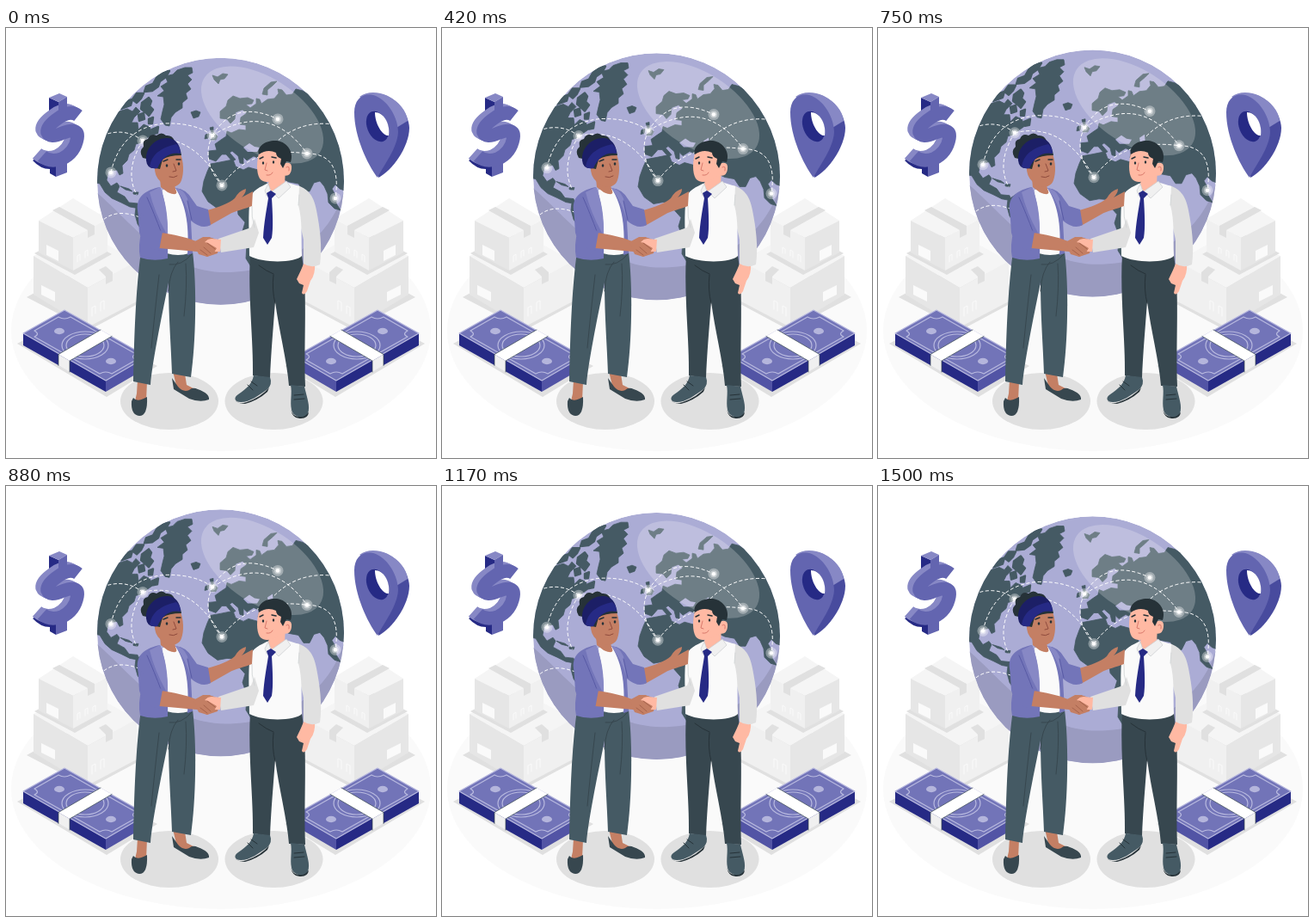
Recreate the animation shown at these times as an HTML page. Size 500 by 500 pixels, loop 1.54 s.

```html
<!DOCTYPE html>
<html lang="en">
<head>
<meta charset="utf-8">
<title>Global partnership</title>
<style>
html, body { margin: 0; width: 100%; height: 100%; overflow: hidden; background: #fff; }
svg { display: block; width: 100%; height: 100%; }
.land { fill: #455a64; stroke: #455a64; stroke-width: .8; stroke-linejoin: round; }
.routes { fill: none; stroke: #fff; stroke-dasharray: 4 2.6; }
.skinA { fill: #c47f64; } .skinB { fill: #ffb9a3; }
.jacket { fill: #7375b9; } .lapel { fill: #8788c5; }
.mid { fill: #6365b0; } .navy { fill: #262a85; } .pale { fill: #8788c5; }
.slate { fill: #455a64; } .deep { fill: #37474f; } .ink { fill: #263238; }
.white { fill: #fafafa; } .grey { fill: #e0e0e0; }
.line { fill: none; stroke-linecap: round; stroke-linejoin: round; }
</style>
</head>
<body>
<svg viewBox="0 0 500 500">
<defs>
  <clipPath id="ball"><circle cx="249.5" cy="178.3" r="143.5"/></clipPath>
  <path id="ess" fill="none" stroke-width="15.5" d="M84 102Q75 95 62 104Q47 114 48 121Q51 129 66 122Q85 115 83 128Q80 145 65 152Q51 157 42 149"/>
  <g id="cargo">
    <path class="grey" d="M24 313L95 274 168 313 97 351Z"/>
    <path fill="#f5f5f5" d="M32 265L90 237 152 271 95 302Z"/>
    <path fill="#e6e6e6" d="M32 265L95 302V348L32 310Z"/>
    <path fill="#f0f0f0" d="M95 302L152 271V318L95 348Z"/>
    <path class="grey" d="M33 262L78 238 123 263 80 287Z"/>
    <path class="grey" d="M108 281L116 277 124 284V294L116 298V289Z"/>
    <path fill="#f5f5f5" d="M78 198L118 222 78 244 38 224Z"/>
    <path fill="#e6e6e6" d="M38 224L78 244V282L38 261Z"/>
    <path fill="#f0f0f0" d="M78 244L118 222V260L78 282Z"/>
    <path class="grey" d="M54 212L62 208 103 230V240L95 244V235Z"/>
    <path fill="#fafafa" d="M47 252L61 259V271L47 264ZM41 299L57 307V318L41 310Z"/>
    <path class="line" stroke="#fafafa" d="M83 272V265L86 263V270M92 267V260L95 258V265M101 262V257L104 255V262M100 335V325L104 323V332M110 329V319L114 317V327"/>
  </g>
  <g id="money">
    <path class="grey" d="M13 367L68 337 176 393 117 429Z"/>
    <path class="navy" d="M20 355L116 410V423L20 369Z"/>
    <path fill="#5254a5" d="M116 410L164 382V395L116 423Z"/>
    <path fill="#7274b8" d="M68 328L164 382 116 410 20 355Z"/>
    <g class="line" stroke="#b8b9df" stroke-width="1.2">
      <path d="M68 328L164 382 116 410 20 355Z"/>
      <path d="M61 336Q68 340 75 336L151 379Q144 382 151 386L123 402Q116 398 109 402L33 359Q40 356 33 352Z"/>
      <ellipse cx="92" cy="369" rx="27" ry="16"/><ellipse cx="92" cy="369" rx="22" ry="13"/>
    </g>
    <g fill="#b4b5dc"><ellipse cx="62" cy="352.5" rx="6" ry="3.7"/><ellipse cx="122" cy="387.5" rx="6" ry="3.7"/></g>
    <path fill="#fff" d="M110 351L123 358.500 74 387 61 379.500Z"/>
    <path fill="#f0f0f0" d="M61 379.500L74 387V400L61 392.500Z"/>
    <path class="line" stroke="#37474f" stroke-width=".7" d="M110 351L61 379.500V392.500M123 358.500L74 387V400"/>
  </g>
</defs>

<ellipse class="white" cx="250" cy="352" rx="244" ry="140"/>
<use href="#cargo"/><use href="#cargo" transform="matrix(-1 0 0 1 500 0)"/>

<g id="globe">
  <g clip-path="url(#ball)">
    <circle cx="249.5" cy="178.3" r="143.5" fill="#abacd5"/>
    <path fill="#9a9bc0" d="M104 190C146 225 185 284 255 284S376 245 393 190V323H104Z"/>
    <g class="land">
      <path d="M100 150L112 122 122 106 131 97 141 94 147 97 151 92 156 97 149 104 146 110 153 110 154 118 160 112 167 115 171 123 164 128 158 133 151 135 149 142 143 147 141 154 135 160 136 169 132 171 129 165 119 167 117 177 122 184 129 180 132 184 129 191 138 196 143 203 153 204 155 210 144 208 134 203 123 198 115 191 109 181 104 180Z"/>
      <path stroke-width="2.4" d="M134 94L141 85 147 83 145 90ZM147 83L152 76 160 76 157 82 152 87ZM161 74L163 68 171 65 175 58 182 51 190 50 186 57 179 62 177 68 170 73ZM158 87L166 81 169 85 167 91 171 95 166 102 162 98 157 94ZM154 101L160 99 161 106 155 108ZM166 106L171 104 170 111 166 111ZM170 118L177 115 176 122 171 123Z"/>
      <path d="M180 68L188 63 185 56 194 54 199 49 208 46 216 46 217 52 211 55 216 60 211 65 215 71 209 76 211 82 205 87 205 93 197 98 192 104 190 114 185 113 180 106 182 97 184 89 183 80 176 79 184 73Z"/>
      <path d="M215 98L221 96 226 98 224 103 218 105ZM133 184L143 187 147 190 139 188ZM148 191L154 191 153 194 148 193Z"/>
      <path d="M151 209L160 203 171 206 183 214 195 222 190 244 170 268 160 248 159 237 153 228 150 217Z"/>
      <path d="M240 55L246 57 252 53 258 54 254 59 249 60 247 65 242 60Z"/>
      <path d="M298 77L300 70 308 63 315 62 310 67 304 72 304 78Z"/>
      <path d="M237 116L241 115 241 121 246 126 244 130 238 130 240 125ZM232 124L236 123 235 128 231 129Z"/>
      <path d="M249 105L249 97 256 91 258 84 264 79 272 82 281 81 288 84 286 88 279 89 284 93 291 88 291 82 295 83 297 88 304 83 312 82 317 76 316 71 321 72 326 78 333 77 337 71 345 73 360 82 396 140V190L388 187 383 182 379 187 384 196 384 204 389 212 382 210 375 203 374 193 370 184 365 178 358 180 353 190 346 190 340 181 329 179 318 174 306 170 301 162 293 160 295 152 288 149 280 154 276 150 276 158 272 157 270 149 263 143 260 145 267 153 263 155 256 147 251 147 244 155 236 152 236 143 245 142 243 135 250 130 256 126 257 120 262 122 271 118 279 119 279 113 272 112 273 104 280 99 275 95 267 98 266 106 261 111 257 106Z"/>
      <path d="M238 158L249 156 264 153 267 161 276 165 282 162 293 165 301 176 308 190 319 201 317 212 306 220 309 245 301 263 287 281 279 268 280 250 275 236 278 226 270 217 269 209 257 208 246 210 235 202 228 190 230 178 234 167Z"/>
    </g>
    <path fill="#abacd5" d="M276 139L283 134 289 138 295 139 292 144 281 144ZM304 137L310 133 311 145 306 148Z"/>
    <ellipse cx="298" cy="101" rx="80" ry="43" transform="rotate(33 298 101)" fill="#fff" opacity=".22"/>
    <path class="routes" d="M112 125Q138 115 159 131M122 168Q134 116 184 111Q220 110 240 125M159 131Q137 166 152 194M159 131Q216 118 251 183M240 125Q226 154 251 183M240 125Q266 82 316 106M240 125Q306 84 350 146M251 183Q284 137 350 146M312 135Q340 107 381 112M350 146Q391 146 383 198M109 227Q127 207 160 222"/>
    <g id="nodes" fill="#fff"></g>
  </g>
</g>

<use href="#money"/><use href="#money" transform="matrix(-1 0 0 1 500 0)"/>
<ellipse class="grey" cx="190" cy="434" rx="57" ry="33"/>
<ellipse class="grey" cx="311.5" cy="434" rx="57" ry="33"/>

<g id="dollar">
  <path class="navy" d="M50 81L61 86V103L50 98ZM31 154L36 151 58 160V173L51 169V164Q40 164 31 154Z"/>
  <path class="pale" d="M50 81L62 76 71 80 61 86Z"/>
  <g stroke="#8788c5">
    <use href="#ess" x="-6" y="-3"/><use href="#ess" x="-3" y="-1.5"/>
  </g>
  <path class="mid" d="M61 86L71 80V98L61 104ZM58 154L71 148V168L58 173Z"/>
  <use href="#ess" stroke="#6365b0"/>
</g>
<g id="pin">
  <path fill="#484b9e" d="M430 76C452 77 468 98 469 116C469 138 449 166 433 174Z"/>
  <path class="pale" d="M411 80C420 73 433 74 444 79C457 86 466 96 467 108L454 116 430 90Z"/>
  <path class="mid" d="M405 98C405 82 416 74 430 79C446 86 456 106 456 121C455 140 440 158 432 174C420 158 405 126 405 98Z"/>
  <ellipse class="navy" cx="432" cy="114.5" rx="12" ry="18.5" transform="rotate(-22 432 114.5)"/>
  <path fill="#fff" d="M429 98C439 98 447 111 445 125C438 126 429 112 429 98Z"/>
</g>

<g id="man">
  <path class="deep" d="M284 264C281 310 288 365 287 404L307 407C308 380 311 345 313 318C317 350 327 388 329 416L348 417C346 360 351 310 344 264Z"/>
  <path class="line" stroke="#263238" d="M313 320Q309 305 311 287M294 276Q303 283 311 286"/>
  <path class="ink" d="M266 430Q267 439 280 435Q297 429 306 418L304 423Q293 433 278 437Q266 437 266 430ZM331 443Q333 453 344 452L352 447Q351 454 343 454Q333 455 331 443Z"/>
  <path class="slate" d="M288 404L307 406Q310 414 304 420C294 427 284 435 273 435C266 435 264 430 270 426C280 419 286 414 288 404ZM331 415L347 417C350 430 354 440 351 448C346 455 334 453 332 444C330 434 333 425 331 415Z"/>
  <path class="line" stroke="#263238" d="M281 415L287 421M285 411L292 416M335 427L346 426M335 432L347 431"/>
  <path class="skinB" d="M347 272L359 273Q360 287 354 294L350 306Q346 312 344 308L346 299 341 297 338 292Q343 282 347 272Z"/>
  <path class="grey" d="M338 183C350 186 358 194 361 212C365 232 368 255 365 275Q355 280 346 274V246L339 215Z"/>
  <path class="white" d="M306 180C296 184 285 190 284 198C281 215 283 240 283 265C299 274 337 273 344 265C343 242 345 225 340 206L341 184 325 179Z"/>
  <path class="grey" d="M285 232L247 245 250 261 288 255 294 238 289 222Z"/>
  <path class="line" stroke="#cfd2d4" stroke-width=".8" d="M286 207Q285 219 289 232M340 206L341 194"/>
  <path class="skinB" d="M309 168L325 162 324 183 309 190 304 184Z"/>
  <path fill="#f0f0f0" stroke="#c9ccce" stroke-width=".7" d="M305 181L301 189 303 195 308 190ZM326 178L331 185 317 198 309 190Z"/>
  <path class="navy" d="M303 192L308 189 314 193 309 198C310 214 311 233 309 244L304 252 299 244C300 226 303 211 305 198Z"/>
  <path class="skinB" d="M295 143C291 154 291 169 295 175C300 182 314 179 321 171Q331 174 332 164Q333 155 325 157L319 140Z"/>
  <path class="ink" d="M294 147C291 137 303 130 315 131C328 133 335 145 331 156L326 155 322 163 319 158 320 152Q314 150 314 145Q304 140 294 147Z"/>
  <g class="ink"><ellipse cx="299" cy="157" rx="1.2" ry="1.8"/><ellipse cx="311" cy="156" rx="1.2" ry="1.8"/></g>
  <path class="line" stroke="#263238" stroke-width="1.5" d="M295 152L299 150M309 150L314 151"/>
  <path class="line" stroke="#d9796c" d="M303 157L301 165 304 166M303 171Q308 172 310 168M326 162Q330 159 329 166"/>
</g>

<g id="woman">
  <path class="skinA" d="M153 409L164 411 163 434 149 438 152 425ZM194 399L208 402 210 415 222 421 213 427 199 420Z"/>
  <path class="deep" d="M148 430Q152 435 160 431L164 429Q165 451 155 451Q145 450 146 434ZM193 407L200 417Q206 424 213 421Q217 417 223 420Q237 425 236 432Q226 436 213 431L195 420Z"/>
  <path class="slate" d="M157 260C151 302 149 358 148 411L168 415C170 390 180 340 189 296C189 336 192 370 193 402L215 406C221 365 222 300 217 260Z"/>
  <path class="line" stroke="#37474f" d="M178 287Q172 340 169 372M189 306Q190 283 200 272M209 274Q211 300 207 335M190 275Q204 277 216 263"/>
  <path class="white" d="M182 188L199 187C210 203 213 235 213 262Q200 266 187 262Z"/>
  <path class="skinA" d="M178 165L195 177 197 187Q202 197 188 191L180 185Z"/>
  <path class="skinA" d="M234 212C248 208 259 204 266 198Q271 189 279 187Q279 192 274 197L287 190 286 207C277 211 267 212 259 217L236 230Z"/>
  <path class="jacket" d="M197 186Q210 187 217 200L222 207 235 211 238 229Q228 235 215 224L217 262 211 264C213 235 211 208 197 186Z"/>
  <path class="jacket" d="M179 185C164 188 151 195 153 212L158 235Q153 253 156 267Q171 272 188 268C189 239 188 206 179 185Z"/>
  <path class="lapel" d="M179 185L167 191Q173 215 186 238L188 244Q189 208 179 185ZM197 186Q206 187 211 198L214 222Q210 204 197 186Z"/>
  <path class="line" stroke="#5557a3" stroke-width=".9" d="M164 197Q172 215 181 239M211 201L216 223"/>
  <path class="skinA" d="M180 238C195 240 209 243 221 248L235 243Q247 245 248 251L246 262 234 266 222 260 178 256Z"/>
  <path class="jacket" d="M153 207Q160 225 182 237L178 259Q160 256 155 238Z"/>
  <path class="skinB" d="M250 246L239 245 229 247 226 252 234 252 237 260 249 260Z"/>
  <path class="skinA" d="M218 249L229 243 238 243 231 249 235 250 245 256 242 261 234 266 224 263Z"/>
  <path class="line" stroke="#9f5c47" stroke-width=".8" d="M234 250L243 257M230 255L238 262M226 258L234 264"/>
  <path class="ink" d="M159 151Q154 143 160 138Q158 130 165 129Q168 122 175 125Q181 120 186 125Q193 124 196 131L172 154Z"/>
  <path class="skinA" d="M176 150L202 144C207 155 207 169 204 177C201 187 186 187 180 179Q172 172 173 160Z"/>
  <path class="ink" d="M174 163L174 151 188 143 203 143 204 148Q189 148 182 153L179 164Z"/>
  <path fill="#1c1f66" d="M163 154C162 139 174 128 187 128C197 128 203 136 203 146Q185 143 176 163Q164 165 163 154Z"/>
  <path class="navy" d="M167 161Q170 141 198 135Q203 139 203 146Q185 143 176 163Q170 164 167 161Z"/>
  <g class="ink"><ellipse cx="187" cy="160" rx="1.3" ry="1.8"/><ellipse cx="201" cy="158" rx="1.3" ry="1.8"/></g>
  <path class="line" stroke="#263238" stroke-width="1.4" d="M183 155L188 153M198 153L203 153"/>
  <path class="line" stroke="#8f4b3d" d="M195 158L198 166 194 167M190 173Q195 175 199 172"/>
</g>
</svg>

<script>
const cities = [[122, 168], [159, 131], [240, 125], [316, 106], [350, 146], [383, 198], [251, 183]];
document.getElementById('nodes').innerHTML = cities.map(([x, y]) =>
  `<circle cx="${x}" cy="${y}" r="6.5" opacity=".35"/><circle cx="${x}" cy="${y}" r="4" opacity=".4"/><circle cx="${x}" cy="${y}" r="2.3"/>`).join('');

const globe = document.getElementById('globe');
const LOOP = 1540, STEPS = 37, RISE = 10;

// The globe rises and sinks at constant speed, in 24 steps per second.
function draw(now) {
  const step = Math.floor((now % LOOP + 4) * 0.024) % STEPS;
  const phase = (step + 1) / STEPS;
  const lift = RISE * (1 - Math.abs(1 - 2 * phase));
  globe.setAttribute('transform', `translate(0 ${(0.5 - lift).toFixed(2)})`);
  requestAnimationFrame(draw);
}
draw(performance.now());
</script>
</body>
</html>
```
